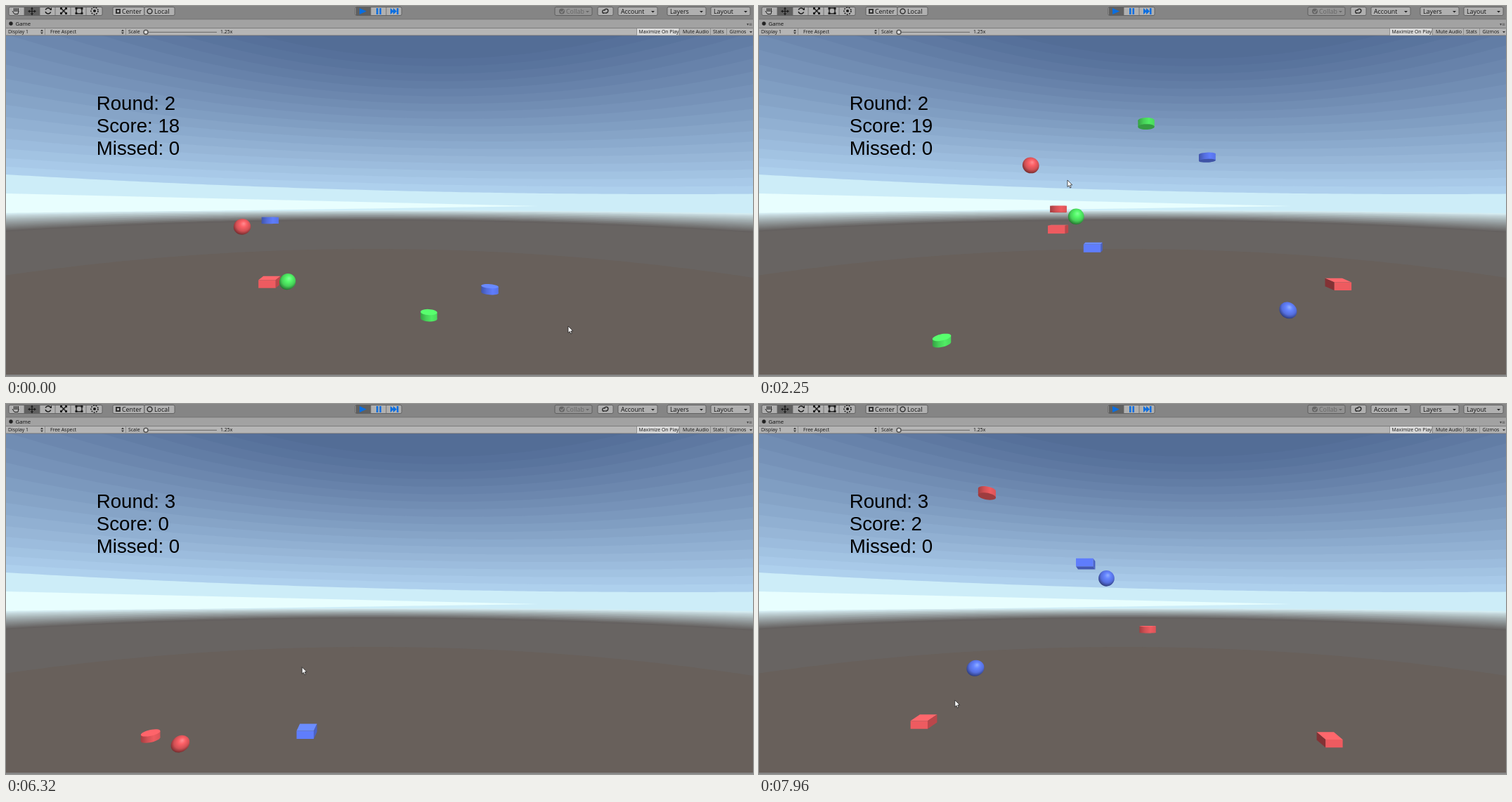
Write an HTML page with a canvas that moves like this. It is 1063x527 px and loops after 8 s.

```html
<!DOCTYPE html>
<html lang="en">
<head>
<meta charset="utf-8">
<style>
html, body { margin: 0; width: 100%; height: 100%; overflow: hidden; background: #68605a; }
canvas { display: block; }
</style>
</head>
<body>
<canvas id="stage" width="1063" height="527"></canvas>
<script>
const W = 1063, H = 527, LOOP = 8000, STEP = 78;
const ROUND_END = 2.88, ROUND_START = 5.9, HITS = [1.78, ROUND_END, 7.02, 7.56];
const RED = [238, 91, 96], GREEN = [80, 236, 100], BLUE = [95, 125, 252];
const stage = document.getElementById("stage").getContext("2d");
let g = stage;

const rgb = (c, k = 1) => `rgb(${c.map(v => Math.min(255, Math.round(v * k)))})`;
const mixColor = (a, b, k) => a.map((v, i) => v + (b[i] - v) * k);

function rect(color, x, y, w, h) {
  g.fillStyle = color;
  g.fillRect(x, y, w, h);
}

function poly(color, ...points) {
  g.fillStyle = color;
  g.beginPath();
  points.forEach(([x, y]) => g.lineTo(x, y));
  g.closePath();
  g.fill();
}

function line(color, width, ...points) {
  g.strokeStyle = color;
  g.lineWidth = width;
  g.beginPath();
  points.forEach(([x, y]) => g.lineTo(x, y));
  g.stroke();
}

function circle(color, x, y, r, hollow, from = 0, to = 7) {
  g.beginPath();
  g.arc(x, y, r, from, to);
  g.fillStyle = g.strokeStyle = color;
  g.lineWidth = 1.5;
  hollow ? g.stroke() : g.fill();
}

function text(str, x, y, size = 6.9, color = "#111", family = "'Open Sans', sans-serif") {
  g.fillStyle = color;
  g.font = `${size}px ${family}`;
  g.fillText(str, x, y);
}

// Fills everything below the curve y = f(x)
function below(color, f) {
  g.fillStyle = color;
  g.beginPath();
  g.moveTo(0, H);
  for (let x = 0; x <= W + 8; x += 8) g.lineTo(x, f(x));
  g.lineTo(W, H);
  g.fill();
}

function drawScenery() {
  const bands = 18;
  rect("rgb(83,109,150)", 0, 42, W, H);
  for (let i = 0; i < bands; i++) {
    const k = i / bands, y = 75 + 193 * k;
    const bowl = 28 + 160 * (1 - k) ** 2, middle = 620 + 330 * k ** 3;
    below(rgb(mixColor([86, 112, 154], [180, 214, 243], k ** 1.15)),
      x => y - bowl * ((x - middle) / middle) ** 2);
  }
  below("rgb(205,237,248)", x => 268 - 28 * ((x - 950) / 950) ** 2);
  poly("rgb(232,254,254)", [0, 267], [757, 285], [0, 296]);

  const horizon = (mid, drop) => x => mid + drop * ((x - 520) / 530) ** 2;
  for (let k = 0; k <= 1; k += 1 / 12)
    below(rgb(mixColor([212, 235, 240], [101, 97, 96], k ** 0.85)), horizon(291 + 13 * k, 4 + 12 * k));
  below("rgb(104,100,98)", horizon(306, 16));
  below("rgb(104,96,91)", horizon(346, 39));
  rect("#858585", 0, 525, W, 2);
}

function button(x, w, label = "", { dim, arrow, pad = 4 } = {}) {
  g.fillStyle = dim ? "#929292" : "#b0b0b0";
  g.strokeStyle = "#555";
  g.lineWidth = 0.8;
  g.beginPath();
  g.roundRect(x, 1.5, w, 12, 2);
  g.fill();
  g.stroke();
  text(label, x + pad, 10.8, 8.9, dim ? "#666" : "#111");
  if (arrow) poly(dim ? "#666" : "#222", [x + w - 9, 7], [x + w - 4, 7], [x + w - 6.5, 9.5]);
}

function drawToolIcons() {
  const ink = "#1c1c1c";
  button(4, 133);
  rect("#606060", 26, 2, 22, 11);
  for (let x = 26; x < 130; x += 22) line("#666", 0.8, [x, 2], [x, 13]);
  for (let i = 0; i < 4; i++) line(ink, 1, [11.5 + i * 2, 3], [11.5 + i * 2, 8]);
  line(ink, 1, [9, 7], [12, 11.5], [17, 11.5], [18, 7]);
  for (let i = 0; i < 4; i++) {
    g.save();
    g.translate(37, 7.5);
    g.rotate(i * Math.PI / 2);
    line(ink, 1.2, [0, 0], [4, 0]);
    poly(ink, [6, 0], [3, 2], [3, -2]);
    g.restore();
  }
  circle(ink, 60, 7, 4, true, 0.4, 2.9);
  circle(ink, 60, 7, 4, true, 3.5, 6);
  poly(ink, [62, 5], [65, 2], [65, 6]);
  line(ink, 1.4, [78, 3], [86, 11]);
  line(ink, 1.4, [86, 3], [78, 11]);
  g.strokeRect(100, 3, 8, 8);
  for (const x of [77, 84, 98.5, 106.5]) for (const y of [2, 9]) rect(ink, x, y, 3, 3);
  g.setLineDash([2, 1.5]);
  circle(ink, 126, 7, 5, true);
  g.setLineDash([]);
  circle(ink, 126, 7, 2);
}

function drawPlayControls() {
  const blue = "#0a6ee0";
  button(497, 66);
  rect("#606060", 498, 2, 21, 11);
  for (const x of [519, 541]) line("#666", 0.8, [x, 2], [x, 13]);
  poly(blue, [503, 3], [513, 7.5], [503, 12]);
  for (const x of [527, 531.5, 556]) rect(blue, x, 3, 2.5, 9);
  for (const x of [547, 551]) poly(blue, [x, 3], [x + 5, 7.5], [x, 12]);
}

function drawEditor() {
  rect("#858585", 0, 0, W, 42);
  drawToolIcons();
  drawPlayControls();
  button(152, 45, "Center", { pad: 13 });
  button(197, 43, "Local", { pad: 14 });
  rect("#333", 156, 4, 7, 7);
  rect("#b4b4b4", 158, 6, 3, 3);
  circle("#333", 204.5, 7.5, 3.5, true);

  button(781, 53, "Collab", { dim: true, arrow: true, pad: 16 });
  circle("#666", 791, 7.5, 4);
  line("#929292", 1.2, [789, 7.5], [791, 9.5], [794, 5.5]);
  button(842, 22);
  circle("#333", 851, 8, 2.3, true, 1.6, 5.5);
  circle("#333", 854, 7, 2.8, true, 3.4, 7.8);
  line("#333", 1.4, [850, 10], [855, 10]);
  button(871, 56, "Account", { arrow: true });
  button(941, 55, "Layers", { arrow: true });
  button(1003, 56, "Layout", { arrow: true });

  rect("#a2a2a2", 0, 19, W, 12);
  circle("#222", 7, 25, 2.7);
  text("Game", 13.5, 28, 7.8);
  text("▾≡", 1054, 28, 6, "#444", "'DejaVu Sans', sans-serif");

  rect("#b5b5b5", 0, 31, W, 11);
  for (const y of [18.5, 31, 41.5]) rect("#707070", 0, y, W, 0.8);
  rect("#dcdcdc", 898, 32, 59, 9.5);
  const labels = { "Display 1": 3, "Free Aspect": 63, "Scale": 174, "1.25x": 305,
    "Maximize On Play": 900.5, "Mute Audio": 963, "Stats": 1006, "Gizmos": 1029.5 };
  for (const name in labels) text(name, labels[name], 39.3);
  for (const x of [51, 166]) {
    poly("#333", [x - 2, 36], [x + 2, 36], [x, 33.5]);
    poly("#333", [x - 2, 37.5], [x + 2, 37.5], [x, 40]);
  }
  poly("#333", [1058, 36], [1062, 36], [1060, 38.5]);
  for (const x of [55, 170, 897, 958, 1002, 1025]) rect("#888", x, 32, 0.8, 9);
  rect("#666", 200, 36.8, 100, 1);
  circle("#ddd", 199, 37.3, 3);
  circle("#555", 199, 37.3, 3, true);
}

// Offset from the front to the back of an object, towards the vanishing point
const depth = (x, y) => [(531 - x) * 0.045, (300 - y) * 0.06];

function box(x, y, c) {
  const [dx, dy] = depth(x, y);
  const l = x - dx / 2 - 11.8, r = l + 24.4, t = y - dy / 2 - 5.7, b = t + 11.4;
  const lid = dy < 0 ? t : b, side = dx > 0 ? r : l;
  poly(rgb(c, dy < 0 ? 1.13 : 0.7), [l, lid], [r, lid], [r + dx, lid + dy], [l + dx, lid + dy]);
  poly(rgb(c, dx > 0 ? 0.78 : 0.55), [side, t], [side + dx, t + dy], [side + dx, b + dy], [side, b]);
  rect(rgb(c), l, t, r - l, b - t);
}

function disc(x, y, c) {
  const [dx, dy] = depth(x, y), r = 11.7, half = 4.6;
  const ex = Math.hypot(r, dx / 2), ey = dy / 2 * (dx / 2 / ex);
  const shade = g.createLinearGradient(x - ex, 0, x + ex, 0);
  [0.68, 0.88, 1, 0.92].forEach((k, i) => shade.addColorStop(i / 3, rgb(c, k)));
  const cap = (color, cy) => {
    g.fillStyle = color;
    g.beginPath();
    for (let a = 0; a < 6.28; a += 0.2)
      g.lineTo(x + r * Math.cos(a) + dx / 2 * Math.sin(a), cy + dy / 2 * Math.sin(a));
    g.fill();
  };
  const up = dy < 0 ? -half : half;
  cap(shade, y - up);
  poly(shade, [x - ex, y - half - ey], [x + ex, y - half + ey], [x + ex, y + half + ey], [x - ex, y + half - ey]);
  cap(rgb(c, dy < 0 ? 1.1 : 0.66), y + up);
}

function ball(x, y, c) {
  const ox = x - 531, oy = y - 285, turn = Math.atan2(oy, ox);
  g.save();
  g.translate(x, y);
  g.rotate(turn);
  g.scale(1 + 2.2e-6 * (ox * ox + oy * oy), 1);
  g.rotate(-turn);
  const shade = g.createRadialGradient(2, -4.5, 0, 1, -2, 14);
  shade.addColorStop(0, rgb(c.map(v => v + 50)));
  shade.addColorStop(0.3, rgb(c, 1.06));
  shade.addColorStop(0.65, rgb(c, 0.88));
  shade.addColorStop(1, rgb(c, 0.45));
  circle(shade, 0, 0, 11.3);
  g.restore();
}

// shape, colour, launch time, launch x, pace (1 = top of the flight after a second), time of hit
const firstWave = [
  [ball, RED, -3.44, 259, 0.072],
  [box, RED, -2.48, 319, 0.051],
  [ball, GREEN, -1.99, 356, 0.064],
  [disc, BLUE, -1.2, 349, 0.219, HITS[0]],
  [disc, BLUE, -0.78, 706, 0.143],
  [disc, GREEN, -0.28, 608, 0.218],
  [box, RED, 0.16, 871, 0.058],
  [box, BLUE, 0.66, 439, 0.125],
  [disc, RED, 1.1, 400, 0.25],
  [ball, BLUE, 1.41, 772, 0.083],
  [disc, GREEN, 2.17, 258, 0.157],
];
const secondWave = [
  [box, BLUE, 6.2, 425, 0.233],
  [disc, RED, 6.2, 203, 0.16, HITS[2]],
  [ball, RED, 6.23, 246, 0.055, HITS[3]],
  [disc, RED, 6.62, 583, 0.177],
  [box, RED, 6.79, 208, 0.039],
  [disc, RED, 7, 303, 0.72],
  [ball, BLUE, 7.2, 291, 0.2],
  [ball, BLUE, 7.4, 482, 0.66],
  [box, RED, 7.72, 817, 0.052],
];

// Every object rises on the same parabola, drifting towards the middle
function drawWave(wave, t, end) {
  for (const [shape, color, born, x, pace, hit = end] of wave) {
    if (t < born || t >= hit) continue;
    const age = t - born, u = pace * age;
    shape(x + 22.4 * age * Math.sign(531 - x), 488 - 800 * (u - u * u / 2), color);
  }
}

// time, x, y of the pointer tip
const pointerPath = [
  [0, 800, 456], [1, 398, 212], [1.78, 412, 132], [2.25, 438, 247], [2.88, 488, 302], [3.5, 523, 307],
  [3.74, 511, 335], [5.31, 548, 362], [5.9, 549, 366], [6.95, 228, 388], [7.96, 279, 422],
];

function drawPointer(t) {
  const i = Math.max(1, pointerPath.findIndex(p => p[0] >= t));
  const a = pointerPath[i - 1], b = pointerPath[i];
  const [, x, y] = mixColor(a, b, (t - a[0]) / (b[0] - a[0]));
  g.save();
  g.translate(x, y);
  const arrow = new Path2D("M0 0V9.5L2.2 7.6 3.7 11 5.2 10.3 3.8 7 6.8 6.8Z");
  g.fillStyle = "#fff";
  g.fill(arrow);
  g.strokeStyle = "#111";
  g.lineWidth = 0.7;
  g.stroke(arrow);
  g.restore();
}

function drawScore(t) {
  const second = t >= ROUND_START;
  const hits = HITS.filter(hit => t >= hit).length;
  const write = (str, x, y) => text(str, x, y, 27.7, "#000", "'Liberation Sans', Arial, sans-serif");
  [`Round: ${second ? 3 : 2}`, `Score: ${second ? hits - 2 : 18 + hits}`, "Missed: 0"]
    .forEach((str, i) => write(str, 128.7, 147.6 + 32 * i));
  if (t >= ROUND_END && !second) write("Next round will start after 3s", 391, 239.6);
}

const backdrop = document.createElement("canvas");
backdrop.width = W;
backdrop.height = H;
g = backdrop.getContext("2d");
drawScenery();
drawEditor();
g = stage;

let start;
function frame(now) {
  start ??= now;
  const ms = (now - start) % LOOP;
  const t = Math.floor((ms + 20) / STEP) * STEP / 1000;
  g.drawImage(backdrop, 0, 0);
  drawWave(firstWave, t, ROUND_END);
  drawWave(secondWave, t, LOOP);
  drawScore(t);
  drawPointer(t);
  requestAnimationFrame(frame);
}
requestAnimationFrame(frame);
</script>
</body>
</html>
```
